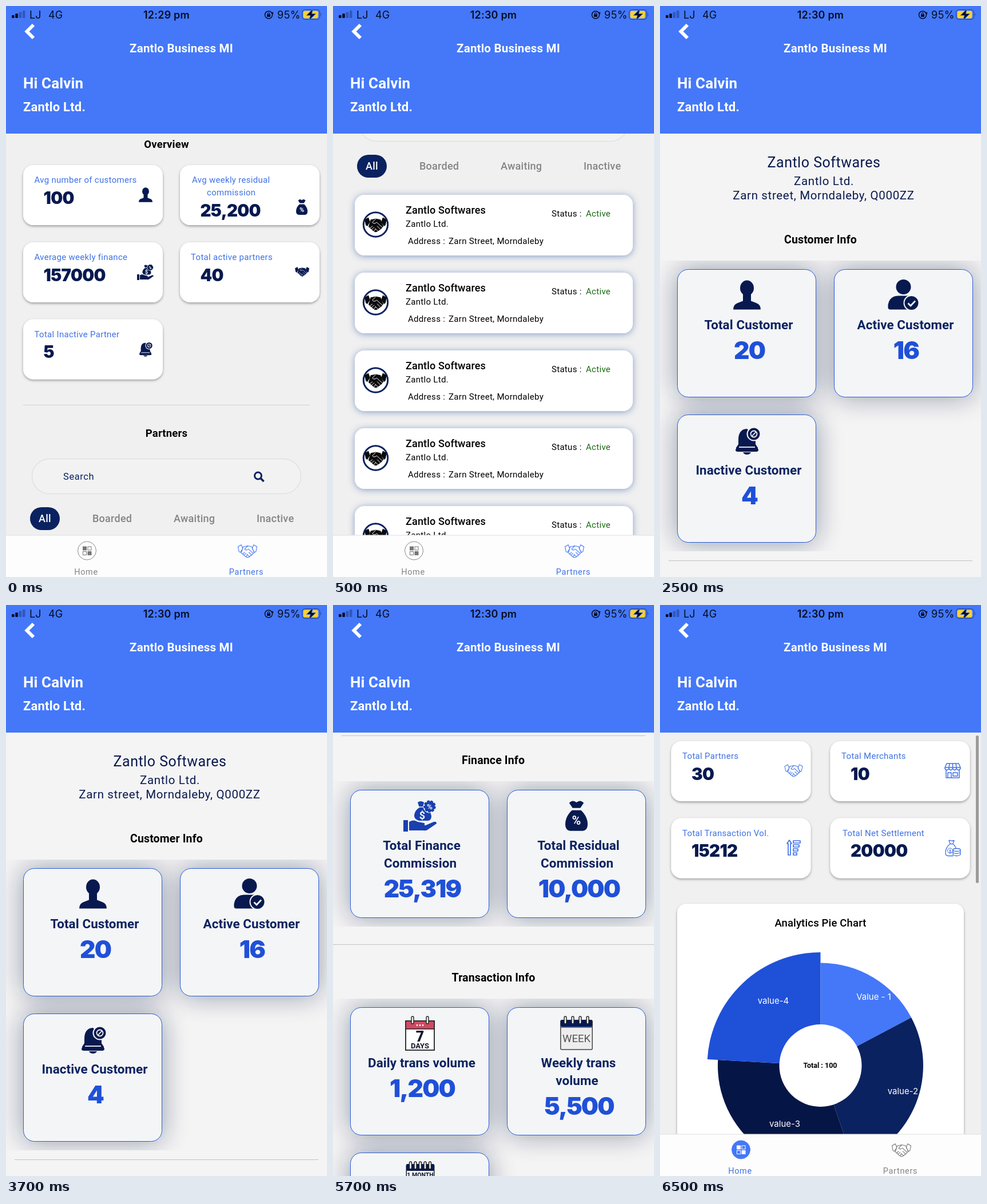
Write an HTML page that moves like this. It is 561 px wide and 998 px high and loops after 8 s.

```html
<!DOCTYPE html>
<html lang="en">
<head>
<meta charset="utf-8">
<title>Business dashboard</title>
<style>
html, body { margin: 0; width: 100%; height: 100%; overflow: hidden; background: #f0f0f0; }
#stage { display: block; width: 100%; height: 100%; }
text { font-family: Roboto, "Open Sans", sans-serif; }
.mid { text-anchor: middle; }
.sys, .num, .big, .slice { font-family: Inter, Roboto, sans-serif; }
.sys { font-size: 18px; fill: #070d24; }
.clock { font-weight: 600; letter-spacing: .2px; }
.title { font-size: 20.5px; font-weight: 700; letter-spacing: .2px; fill: #fff; }
.hi { font-size: 26px; font-weight: 700; letter-spacing: .1px; fill: #fff; }
.firm { font-size: 22px; font-weight: 700; letter-spacing: .2px; fill: #fff; }
.head { font-size: 18.5px; font-weight: 700; letter-spacing: .2px; }
.info { font-size: 19.5px; font-weight: 700; letter-spacing: .15px; }
.label { font-size: 15px; letter-spacing: .3px; fill: #3f72e6; }
.num { font-size: 29.5px; font-weight: 900; letter-spacing: -.7px; fill: #07194f; }
.tile { font-size: 22.4px; font-weight: 700; letter-spacing: .1px; fill: #0a2260; }
.big { font-size: 42.5px; font-weight: 900; letter-spacing: -1.8px; fill: #1f50d8; }
.search { font-size: 16.5px; letter-spacing: .6px; fill: #0a2260; }
.filter { font-size: 18px; font-weight: 500; letter-spacing: .25px; fill: #858585; }
.name { font-size: 18px; font-weight: 500; letter-spacing: .15px; }
.body { font-size: 15px; letter-spacing: .3px; }
.lead { font-size: 25px; letter-spacing: .5px; fill: #0a1a4f; }
.sub { font-size: 20.5px; letter-spacing: .65px; fill: #0a1a4f; }
.tab { font-size: 14.5px; letter-spacing: .65px; }
.chart { font-size: 18.5px; font-weight: 500; letter-spacing: .15px; }
.slice { font-size: 15px; fill: #fff; }
.total { font-size: 12.5px; font-weight: 700; }
</style>
</head>
<body>
<svg id="stage" viewBox="0 0 561 998"></svg>
<script>
const BLUE = '#4478f9', LINK = '#3f72e6', NAVY = '#0a2260', INK = '#07194f', GREY = '#858585', TILE = '#f4f5f6';
const BRAND = 'Zantlo', FIRM = BRAND + ' Ltd.', PARTNER = BRAND + ' Softwares';

// Drawing helpers
const text = (x, y, s, cls, extra = '') => `<text x="${x}" y="${y}" class="${cls}" ${extra}>${s}</text>`;
const rect = (x, y, w, h, r, fill, extra = '') =>
  `<rect x="${x}" y="${y}" width="${w}" height="${h}" rx="${r}" fill="${fill}" ${extra}/>`;
const circle = (x, y, r, fill, extra = '') => `<circle cx="${x}" cy="${y}" r="${r}" fill="${fill}" ${extra}/>`;
const path = (d, fill = 'currentColor', extra = '') => `<path d="${d}" fill="${fill}" ${extra}/>`;
const line = (d, color, w, extra = '') => path(d, 'none', `stroke="${color}" stroke-width="${w}" ${extra}`);
const rule = (x1, x2, y, color) => line(`M${x1} ${y}H${x2}`, color, 1);
const icon = (id, x, y, w, h, color, back = '#fff') =>
  `<use href="#${id}" x="${x}" y="${y}" width="${w}" height="${h}" style="color:${color};--back:${back}"/>`;
const symbol = (id, w, h, body) => `<symbol id="${id}" viewBox="0 0 ${w} ${h}" overflow="visible">${body}</symbol>`;
const shadow = (id, dy, blur, color, alpha) =>
  `<filter id="${id}" x="-40%" y="-40%" width="180%" height="180%"><feDropShadow dx="0" dy="${dy}" stdDeviation="${blur}" flood-color="${color}" flood-opacity="${alpha}"/></filter>`;
const repeat = (n, f) => Array.from({ length: n }, (_, i) => f(i)).join('');

// Icons
const BACK = 'var(--back)', ON = 'currentColor', ROUND = 'stroke-linecap="round" stroke-linejoin="round"';
const mark = (x, y, s, size, color = BACK, weight = 700) =>
  text(x, y, s, 'mid', `style="font-size:${size}px;font-weight:${weight};fill:${color}"`);
const SACK = 'M12 17H28C38 26 40 36 40 42Q40 54 29 54H11Q0 54 0 42C0 36 2 26 12 17Z';
const TUFT = 'M7 4Q13-3 20 3Q27-3 33 4L27 13H13Z';
const CUFFS = 'M0 5L7 1L10 9L5 17L2 15ZM40 5L33 1L30 9L35 17L38 15Z';
const HANDS = 'M11 5L17 4L20 3L29 5L34 17L31 21L27 24L23 27Q19 29 16 26L7 18Z';
const FINGERS = 'M20 4L14 10Q17 14 22 10L32 19M28 22L23 17M24 26L19 21M10 20L14 17M13 23L17 19M17 26L20 22';
const ring = (x, top = 0) => rect(x - 2, top, 4, 13, 2, '#eee', 'stroke="#222" stroke-width="1.4"');

const defs = `<defs>
${shadow('soft', 2, 2.2, '#000', .36)}${shadow('glow', 1.5, 6, '#24469c', .5)}
<filter id="haze" x="-50%" y="-50%" width="200%" height="200%"><feGaussianBlur stdDeviation="23"/></filter>
${symbol('person', 48, 51, `<ellipse cx="24" cy="13.5" rx="12" ry="13.5" fill="currentColor"/>` +
  path('M0 51Q0 42 8 39.5L17 36V24H31V36L40 39.5Q48 42 48 51Z'))}
${symbol('approved', 55, 53, circle(27, 12.5, 13, ON) +
  path('M0 48V44Q2 29 17 28H36Q46 30 48 40L42 52H4Q0 52 0 48Z') +
  circle(41, 40.5, 13, ON, `stroke="${BACK}" stroke-width="2"`) +
  line('M35 41l4.5 4.5l8-8.5', BACK, 2.8))}
${symbol('bell', 43, 47, path('M20 2C9 2 5 11 5 21V29L1 35V39H39V35L35 29V16Z') +
  line('M6 34H34', BACK, 1.8) + path('M0 39Q0 36 4 36H36Q40 36 40 39Q40 42 36 42H4Q0 42 0 39ZM13 43H27Q25 47 20 47Q15 47 13 43Z') +
  circle(32, 11, 12.5, BACK) + circle(32, 11, 10.5, ON) + circle(32, 11, 5.5, 'none', `stroke="${BACK}" stroke-width="1.8"`) +
  line('M28.5 15L36 7', BACK, 1.8))}
${symbol('sack', 40, 54, path(TUFT) + path(SACK) + mark(20, 43, '%', 22))}
${symbol('offer', 58, 56, rect(0, 35, 8, 20, 0, ON) +
  path('M10 38Q18 33 25 38L36 40Q39 42 36 44H28H39L53 38Q58 37 58 41L42 52Q39 54 35 53H10Z') +
  path('M25 4Q30 0 36 4L38 13Q48 18 49 28Q49 35 43 36H27Q18 33 19 26Q20 18 28 13Z') +
  line('M27 12H38', BACK, 1.5) + mark(33, 33, '$', 18) +
  circle(46, 11, 11.5, BACK) + circle(46, 11, 9.2, ON, 'stroke="currentColor" stroke-width="3" stroke-dasharray="4.2 2.2"') + mark(46, 16, '%', 13.5))}
${symbol('deal', 40, 28, path(CUFFS) + path(HANDS) + line(FINGERS, BACK, 1, ROUND))}
${symbol('dealLine', 40, 28, line(CUFFS + HANDS + FINGERS, ON, 1.3, ROUND))}
${symbol('shop', 29, 27, line('M4 1H25L28 8H1ZM1 8V10Q4 15 8 10Q11 15 14.5 10Q18 15 21 10Q25 15 28 10V8M8 8V10M14.5 1V10M21 8V10M9 1L8 8M20 1L21 8M3 13V26H26V13M6 26V17H12V26M15 17H23V23H15Z', ON, 1.5, ROUND))}
${symbol('sort', 25, 29, line('M5 1L1 7H3V27H7V7H9ZM12 2H24V6H12ZM12 9H22V13H12ZM12 16H20V20H12ZM12 23H18V27H12Z', ON, 1.7, ROUND))}
${symbol('coins', 28, 29, line('M7 1L9 7H14L16 1L12 2L10 1ZM8 8C3 12 1 18 1 23Q1 28 6 28H14M15 8Q18 11 19 14M14 18V26Q20 30 27 26V18M14 22Q20 26 27 22', ON, 1.3, ROUND) +
  `<ellipse cx="20.5" cy="17.5" rx="6.5" ry="2.5" fill="none" stroke="currentColor" stroke-width="1.3"/>` +
  circle(9, 19, 4.5, 'none', 'stroke="currentColor"') + mark(9, 22, '$', 8, ON))}
${symbol('day', 52, 60, rect(1, 8, 50, 51, 0, '#fff', 'stroke="#222" stroke-width="1.8"') +
  rect(1, 8, 50, 14, 0, '#cf4a63', 'stroke="#222" stroke-width="1.5"') +
  repeat(3, i => circle(21 + i * 5, 15.5, 1.4, '#fff')) + ring(13) + ring(39) +
  mark(26, 44, '7', 25, '#14182c', 900) + mark(26, 56, 'DAYS', 13, '#14182c'))}
${symbol('week', 57, 59, rect(.8, 7, 55.4, 51, 2, '#ededed', 'stroke="#444" stroke-width="1.5"') +
  rect(.8, 6, 55.4, 12, 2, INK) + rect(.8, 18, 55.4, 2, 0, '#4a6db8') + repeat(4, i => ring(9 + i * 13)) +
  mark(28.5, 44.5, 'WEEK', 18.5, '#555', 400))}
${symbol('month', 50, 59, rect(.8, 5, 48.4, 53, 2, '#f4f4f4', 'stroke="#222" stroke-width="1.5"') +
  rect(.8, 4, 48.4, 12, 2, INK) + repeat(5, i => ring(8 + i * 8.5)) + mark(25, 27, '1 MONTH', 10.5, '#14182c'))}
</defs>`;

// Shared pieces
function stat(x, y, label, labelX, value, extraLine) {
  const drop = extraLine ? 22 : 0;
  return rect(x, y, 244, 105, 18, '#fff', 'filter="url(#soft)"') +
    text(labelX, y + 31, label, 'label') +
    (extraLine ? text(351, y + 53, extraLine, 'label') : '') +
    text(x + 35.5, y + 67.5 + drop, value, 'num');
}

const spot = i => [i % 2 ? 304 : 30, 15 + Math.floor(i / 2) * 254];

function tile(i, lines, value, art) {
  const [x, y] = spot(i), last = y + 105 + (lines.length - 1) * 31;
  return rect(x + .5, y + .5, 242, 223, 19, TILE, 'stroke="#2a5bdc"') + art(x, y) +
    lines.map((s, n) => text(x + 125 - n * 2.5, y + 105 + n * 31, s, 'tile mid')).join('') +
    text(x + 126, last + 52, value, 'big mid');
}

function strip(y, h, tiles) {
  const haze = repeat(tiles.length, i => {
    const [sx, sy] = spot(i);
    return rect(sx, sy, 243, 224, 20, '#0a143c', 'opacity=".4" filter="url(#haze)"');
  });
  return `<svg x="0" y="${y}" width="561" height="${h}">${haze}${tiles.map((t, i) => tile(i, ...t)).join('')}</svg>`;
}

const art = (id, dx, dy, w, h, color = INK) => (x, y) => icon(id, x + dx, y + dy, w, h, color, TILE);

function tabBar(active) {
  const home = active === 'home', ink = home ? '#fff' : '#777';
  const dot = (x, y, full) => rect(x, y, 6, 6, 0, full ? ink : 'none', `stroke="${ink}"`);
  return rect(0, 925, 561, 73, 0, '#fdfdfd') + rule(0, 561, 925, '#dedede') +
    circle(141.5, 952, 16, home ? BLUE : '#fff', `stroke="${home ? BLUE : '#888'}"`) +
    dot(134.5, 945, true) + dot(143, 945, false) + dot(134.5, 953.5, false) + dot(143, 953.5, true) +
    text(140, 994, 'Home', 'tab mid', `fill="${home ? LINK : GREY}"`) +
    icon('dealLine', 405.5, 940, 33, 25, home ? '#777' : BLUE) +
    text(420, 994, 'Partners', 'tab mid', `fill="${home ? GREY : LINK}"`);
}

// Pages
function partnerCard(i) {
  const y = 946 + i * 136;
  return rect(38, y, 486, 106, 17, '#fff', 'filter="url(#glow)"') +
    circle(74.5, y + 52, 21.2, '#fff', `stroke="${NAVY}" stroke-width="3"`) +
    icon('deal', 54.5, y + 38.5, 40, 27, '#0b0b0b') +
    text(127, y + 33, PARTNER, 'name') + text(127, y + 56, FIRM, 'body') +
    text(131, y + 85.5, 'Address :', 'body') + text(202, y + 85.5, 'Zarn Street, Morndaleby', 'body') +
    text(382, y + 38, 'Status :', 'body') + text(442, y + 38, 'Active', 'body', 'fill="#1a6a12"');
}

const partnersPage = text(280.5, 248, 'Overview', 'head mid') +
  stat(30, 278, 'Avg number of customers', 49.5, '100') + icon('person', 232, 317, 24, 26, INK) +
  stat(304, 278, 'Avg weekly residual', 325, '25,200', 'commission') + icon('sack', 507, 338, 20, 27, INK) +
  stat(30, 413, 'Average weekly finance', 49.5, '157000') + icon('offer', 229, 451, 29, 29, INK) +
  stat(304, 413, 'Total active partners', 323, '40') + icon('deal', 505, 455, 25, 18, INK) +
  stat(30, 547.5, 'Total Inactive Partner', 49.5, '5') + icon('bell', 233, 587.5, 23, 25.5, INK) +
  rule(30, 531, 697.5, '#d0d0d0') + text(280.5, 753, 'Partners', 'head mid') +
  rect(45.5, 791.5, 470, 61, 30.5, '#f1f2f1', 'stroke="#e0e1e0" stroke-width="1.5"') +
  text(100, 828, 'Search', 'search') +
  circle(440.5, 821, 6, 'none', `stroke="${NAVY}" stroke-width="3"`) + line('M445 825.5L450.5 831', NAVY, 3.5) +
  rect(42, 876, 52, 40, 20, NAVY) + text(68, 901.5, 'All', 'filter mid', 'style="fill:#fff"') +
  text(151, 901.5, 'Boarded', 'filter') + text(293, 901.5, 'Awaiting', 'filter') + text(438, 901.5, 'Inactive', 'filter') +
  repeat(5, partnerCard);

const detailPage = text(286.5, 282, PARTNER, 'lead mid') + text(286.5, 313, FIRM, 'sub mid') +
  text(286, 338, 'Zarn street, Morndaleby, Q000ZZ', 'sub mid') +
  text(280.5, 415, 'Customer Info', 'info mid') +
  strip(445, 508, [
    [['Total Customer'], '20', art('person', 98, 19.5, 48, 51)],
    [['Active Customer'], '16', art('approved', 94.5, 18.5, 55, 53)],
    [['Inactive Customer'], '4', art('bell', 102, 23, 43, 47)]
  ]) +
  rule(15, 546, 969.5, '#c2c2c2') + text(280, 1019, 'Finance Info', 'info mid') +
  strip(1049, 254, [
    [['Total Finance', 'Commission'], '25,319', art('offer', 93, 18, 58, 56, '#1840b0')],
    [['Total Residual', 'Commission'], '10,000', art('sack', 102, 19, 39, 53)]
  ]) +
  rule(0, 561, 1334.5, '#c2c2c2') + text(280.5, 1399, 'Transaction Info', 'info mid') +
  strip(1429, 400, [
    [['Daily trans volume'], '1,200', art('day', 96, 16, 52, 60)],
    [['Weekly trans', 'volume'], '5,500', art('week', 93, 16, 57, 59)],
    [['Monthly volume'], '', art('month', 97.5, 16, 50, 59)]
  ]);

function wedge(from, to, r, color) {
  const at = a => {
    const t = a * Math.PI / 180;
    return `${280.5 + r * Math.sin(t)} ${805 - r * Math.cos(t)}`;
  };
  return path(`M280.5 805L${at(from)}A${r} ${r} 0 0 1 ${at(to)}Z`, color);
}

const homePage = stat(19.5, 238, 'Total Partners', 39, '30') + icon('dealLine', 218, 278, 31, 22, LINK) +
  stat(297.5, 238, 'Total Merchants', 317, '10') + icon('shop', 497, 276, 29, 27, LINK) +
  stat(19.5, 372.5, 'Total Transaction Vol.', 39, '15212') + icon('sort', 221, 410, 25, 29, LINK) +
  stat(297.5, 372.5, 'Total Net Settlement', 319, '20000') + icon('coins', 498, 410.5, 28, 29, LINK) +
  rect(552, 228, 5, 258, 2.5, '#9a9a9a') +
  rect(30, 522, 501, 520, 16, '#fff', 'filter="url(#soft)"') +
  text(280.5, 562, 'Analytics Pie Chart', 'chart mid') +
  wedge(0, 62.1, 179.5, BLUE) + wedge(62.1, 161.2, 179.5, NAVY) +
  wedge(161.2, 273.2, 179.5, '#051646') + wedge(273.2, 360, 198, '#1f50d8') +
  circle(280.5, 805, 72, '#fff') + text(280, 809, 'Total : 100', 'total mid') +
  text(373.5, 690, 'Value - 1', 'slice mid') + text(424.5, 855, 'value-2', 'slice mid') +
  text(218, 912, 'value-3', 'slice mid') + text(198, 697, 'value-4', 'slice mid');

const header = rect(0, 0, 561, 223, 0, BLUE) +
  repeat(4, i => rect(10 + i * 6.3, 16 - i * 2.7, 4.6, 5 + i * 2.7, 1, '#070d24', i > 1 ? 'opacity=".3"' : '')) +
  text(41, 21.5, 'LJ', 'sys') + text(74, 21.5, '4G', 'sys') +
  text(280.5, 22, '', 'sys clock mid', 'id="clock"') +
  circle(459, 15.5, 6.5, 'none', 'stroke="#070d24" stroke-width="1.5"') +
  rect(456, 14.5, 6, 4.5, 1, '#070d24') + line('M457.3 15V13.5a1.7 1.7 0 0 1 3.4 0V15', '#070d24', 1.1) +
  path('M463 11l4.5 0l-1 4z', '#070d24') +
  text(474, 21.5, '95%', 'sys', 'letter-spacing=".5"') +
  rect(517.5, 6.5, 31, 17, 5, 'none', 'stroke="#070d24" stroke-opacity=".5"') +
  rect(519.5, 8.5, 26, 13, 3, '#fdd230') + path('M550 12.5q2 2.5 0 5z', '#070d24', 'opacity=".5"') +
  path('M536.5 5L525 16.5H532L529.5 25L541.5 13.5H534.5Z', '#070d24', `stroke="${BLUE}"`) +
  line('M48 33L36.5 44.5L48 56', '#fff', 6) +
  text(306.5, 81, BRAND + ' Business MI', 'title mid') +
  text(30, 144, 'Hi Calvin', 'hi') + text(30, 184, FIRM, 'firm');

// Scene list: end time in ms, page, scroll offset, clock
const scenes = [
  { end: 500, page: 'partners', scroll: 0, clock: '12:29 pm' },
  { end: 2500, page: 'partners', scroll: 616, clock: '12:30 pm' },
  { end: 4500, page: 'detail', scroll: 0, clock: '12:30 pm' },
  { end: 6500, page: 'detail', scroll: 741, clock: '12:30 pm' },
  { end: 8000, page: 'home', scroll: 0, clock: '12:30 pm' }
];
const pages = {
  partners: { body: partnersPage, back: '#f0f0f0', bar: true },
  detail: { body: detailPage, back: '#f4f4f4', bar: false },
  home: { body: homePage, back: '#f0f0f0', bar: true }
};

const stage = document.getElementById('stage');
stage.innerHTML = defs + Object.entries(pages).map(([id, p]) =>
  `<g id="${id}">${rect(0, 0, 561, 998, 0, p.back)}<g>${p.body}</g>${p.bar ? tabBar(id) : ''}</g>`).join('') + header;

const clock = document.getElementById('clock');
const groups = Object.keys(pages).map(id => document.getElementById(id));
let shown;

function render(ms) {
  const t = ms % 8000, scene = scenes.find(s => t < s.end);
  if (scene === shown) return;
  shown = scene;
  clock.textContent = scene.clock;
  for (const g of groups) {
    const active = g.id === scene.page;
    g.style.display = active ? '' : 'none';
    if (active) g.children[1].setAttribute('transform', `translate(0 ${-scene.scroll})`);
  }
}

const start = performance.now();
function tick() {
  render(performance.now() - start);
  requestAnimationFrame(tick);
}
tick();
</script>
</body>
</html>
```
